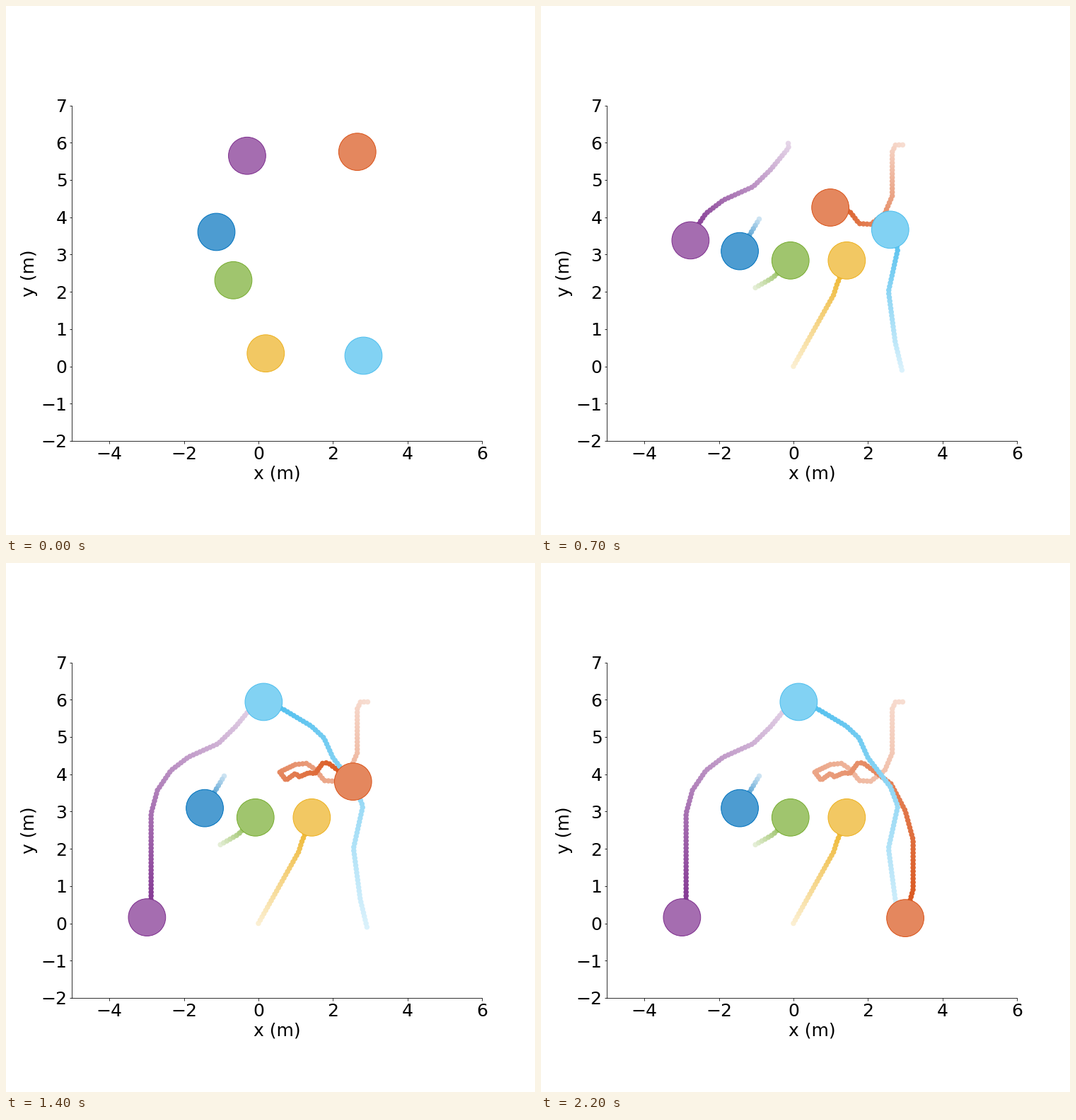
Recreate the animation shown at these times as a matplotlib script. Size 748 px wide and 748 px high, loop 3200 ms.

```python
import numpy as np
import matplotlib.pyplot as plt
from matplotlib.animation import FuncAnimation
from matplotlib.colors import to_rgb

SIZE, DPI = 748, 72
FRAMES, MOVING = 32, 22
STEPS = 5      # walking steps per frame
FADE = 0.2     # strength of the oldest trail dot


def tint(color, strength):
    """Mix a colour with white; strength may be an array."""
    s = np.atleast_1d(strength)[:, None]
    return 1 - s * (1 - np.array(to_rgb(color)))


def walk(steps, *points):
    """Positions at steady pace along a line through key points, in metres."""
    line = np.array(points)
    dist = np.r_[0, np.cumsum(np.hypot(*np.diff(line, axis=0).T))]
    at = np.linspace(0, dist[-1], steps + 1)
    return np.column_stack([np.interp(at, dist, axis) for axis in line.T])


def join(*walks):
    """Chain walks that share their end points."""
    return np.vstack([walks[0]] + [w[1:] for w in walks[1:]])


class Agent:
    def __init__(self, ax, color, path):
        self.color, self.path = color, path
        self.trail = ax.scatter([], [], s=36, linewidths=1.5, zorder=2)
        self.body = plt.Circle(path[0], 0.5, facecolor=tint(color, 0.7)[0],
                               edgecolor=color, linewidth=1, zorder=3)
        ax.add_patch(self.body)

    def show(self, step):
        seen = self.path[:step + 1]
        self.trail.set_offsets(seen)
        self.trail.set_color(tint(self.color, np.linspace(FADE, 1, len(seen))))
        self.body.center = seen[-1]


blue = walk(10, (-0.92, 3.95), (-1.44, 3.09))
green = walk(12, (-1.02, 2.11), (-0.55, 2.38), (-0.08, 2.84))
yellow = walk(32, (0, 0), (1.08, 1.92), (1.16, 2.18), (1.43, 2.84))
purple = walk(72, (-0.14, 5.98), (-0.13, 5.86), (-0.61, 5.28), (-1.08, 4.82),
              (-1.88, 4.46), (-2.35, 4.1), (-2.71, 3.57), (-2.88, 2.95),
              (-2.88, 0.66), (-2.99, 0.16))
cyan = walk(74, (2.91, -0.1), (2.73, 0.65), (2.55, 2.01), (2.8, 3.14),
            (2.6, 3.66), (2, 4.44), (1.76, 4.97), (1.42, 5.29),
            (0.65, 5.75), (0.14, 5.94))

# Orange comes in, weaves slowly in the crowd, then leaves.
meet, leave = (0.99, 4.26), (1.72, 4.29)
orange = join(
    walk(39, (2.93, 5.94), (2.74, 5.94), (2.65, 5.75), (2.65, 4.57),
         (2.45, 4.1), (2.07, 3.81), (1.76, 3.83), (1.54, 4.12),
         (1.29, 4.29), meet),
    walk(25, meet, (0.57, 4.06), (0.74, 3.84), (0.99, 4.02), (1.1, 3.93),
         (1.35, 4.04), (1.52, 4.02), leave),
    walk(49, leave, (1.86, 4.31), (2.62, 3.74), (3, 3.02), (3.21, 2.24),
         (3.21, 0.91), (3, 0.14)))

plt.rcParams.update({"font.family": "DejaVu Sans", "font.size": 25})
fig, ax = plt.subplots(figsize=(SIZE / DPI, SIZE / DPI), dpi=DPI)
fig.subplots_adjust(left=0.1249)
ax.set_aspect("equal")
ax.set(xlim=(-5, 6), ylim=(-2, 7), xticks=range(-4, 7, 2), yticks=range(-2, 8),
       xlabel="x (m)", ylabel="y (m)")
ax.spines[["top", "right"]].set_visible(False)

agents = [Agent(ax, color, path) for color, path in [
    ("#0072BD", blue), ("#D95319", orange), ("#EDB120", yellow),
    ("#7E2F8E", purple), ("#77AC30", green), ("#4DBEEE", cyan)]]


def update(frame):
    step = STEPS * (min(frame, MOVING) + 1) - 1
    for agent in agents:
        agent.show(step)
    return []


anim = FuncAnimation(fig, update, frames=FRAMES, interval=100,
                     init_func=lambda: update(0), repeat=True)
plt.show()
```
